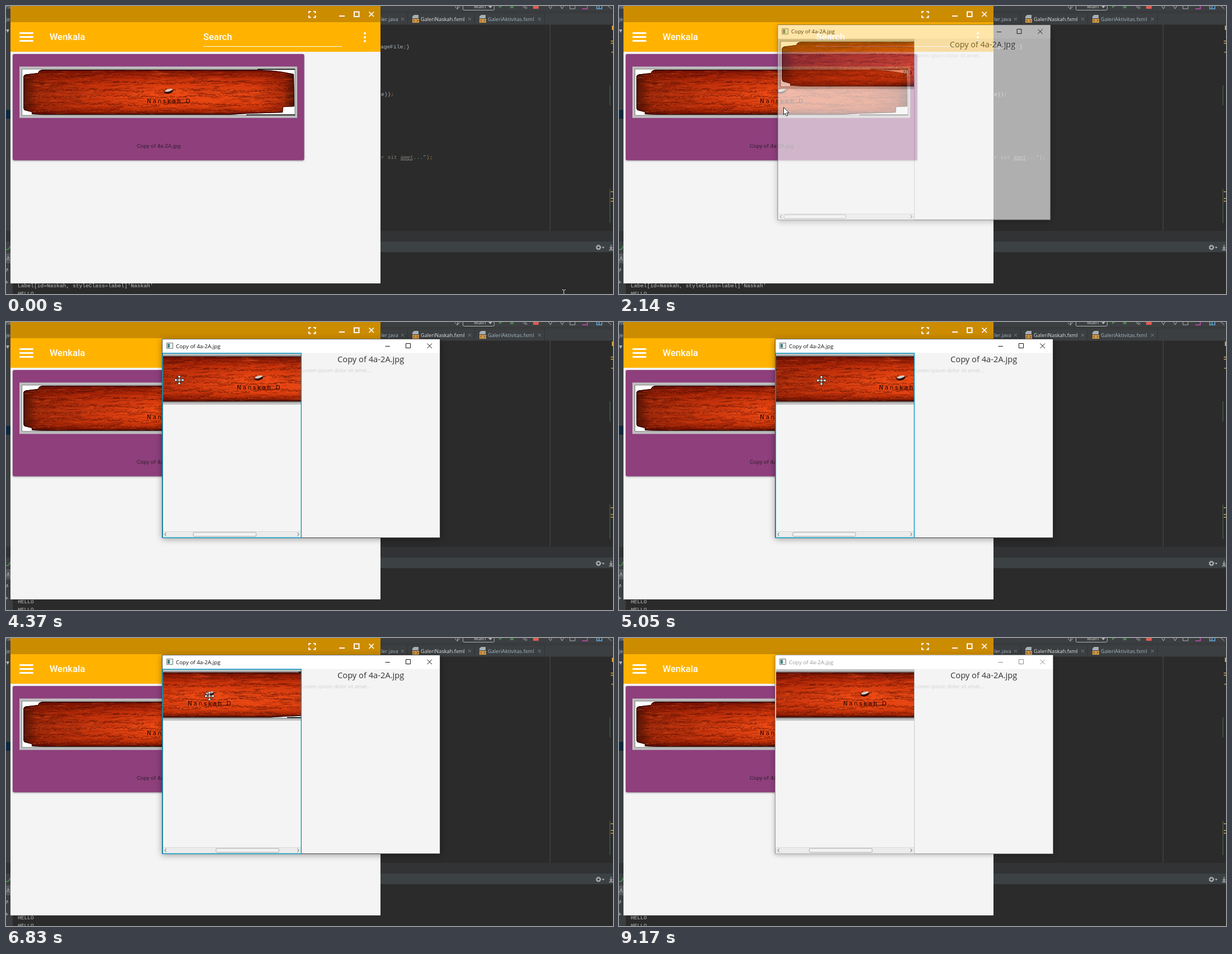
An HTML page that plays this animation: 1086x516 px, repeating every 9.34 s.

```html
<!DOCTYPE html>
<html lang="id">
<head>
<meta charset="utf-8">
<title>Galeri Naskah</title>
<style>
html, body { margin: 0; width: 100%; height: 100%; overflow: hidden; background: #2b2b2b; }
svg { display: block; width: 1086px; height: 516px; }
text { white-space: pre; }
.ui { font-family: "Open Sans", "Noto Sans", sans-serif; }
.app { font-family: Roboto, sans-serif; }
.code { font: 9.65px "Liberation Mono", monospace; fill: #a9b7c6; }
.tab { font-size: 9.2px; fill: #a9b7c6; }
.line { fill: none; stroke: #afb1b3; }
.white { fill: none; stroke: #fff; }
.card { filter: drop-shadow(0 1px 1.500px rgba(0,0,0,.35)); }
.frame { fill: #f4f4f4; stroke: #4b4b4b; filter: drop-shadow(0 2px 6px rgba(0,0,0,.36)); }
.idle .frame { stroke: #9a9a9a; filter: drop-shadow(0 1px 4px rgba(0,0,0,.3)); }
.caption { fill: #111; }
.buttons { fill: none; stroke: #111; }
.idle .caption { fill: #999; }
.idle .buttons { stroke: #8a8a8a; }
</style>
</head>
<body>
<svg viewBox="0 0 1086 516">
<defs>
  <linearGradient id="wood" x2="0" y2="1">
    <stop offset="0" stop-color="#4a0a00"/><stop offset=".08" stop-color="#9c2006"/>
    <stop offset=".25" stop-color="#cf360b"/><stop offset=".55" stop-color="#ee4a14"/>
    <stop offset=".8" stop-color="#e4420f"/><stop offset=".93" stop-color="#a82706"/>
    <stop offset="1" stop-color="#300500"/>
  </linearGradient>
  <linearGradient id="ends">
    <stop offset="0" stop-color="#1c0300" stop-opacity=".75"/><stop offset=".05" stop-color="#500a00" stop-opacity=".5"/>
    <stop offset=".3" stop-color="#800f00" stop-opacity=".25"/><stop offset=".48" stop-color="#800f00" stop-opacity="0"/>
    <stop offset=".85" stop-color="#800f00" stop-opacity=".08"/><stop offset=".96" stop-color="#5a0a00" stop-opacity=".45"/>
    <stop offset="1" stop-color="#1c0300" stop-opacity=".75"/>
  </linearGradient>
  <path id="plank" d="M31 127Q32 122 40 122L57 120Q59 114 67 114L445 114Q480 115 500 119L515 122L516 180L496 181L495 191L432 193L400 195H70L46 194V190L34 187Q31 186 31 180Z"/>
  <clipPath id="plankClip"><use href="#plank"/></clipPath>
  <clipPath id="paneClip"><path d="M281 56H528V375H281Z"/></clipPath>
  <g id="photo">
    <path fill="#c0c0c0" d="M24 108.500H521V200.500H24Z"/>
    <path fill="#fff" stroke="#777" d="M28.500 113H517V196H28.500Z"/>
    <path stroke="#000" stroke-width="1.500" d="M430 195H517M450 113.500H517"/>
    <use href="#plank" fill="url(#wood)"/>
    <use href="#plank" fill="url(#ends)"/>
    <g clip-path="url(#plankClip)" fill="none">
      <path id="shade" stroke="#7a1000" stroke-opacity=".22" stroke-width="2.500"/>
      <path id="darkGrain" stroke="#2a0400" stroke-opacity=".38" stroke-width=".7"/>
      <path id="lightGrain" stroke="#ff6a2c" stroke-opacity=".4" stroke-width=".7"/>
      <path id="script" stroke="#330800" stroke-opacity=".55" stroke-width=".9"/>
      <use href="#plank" stroke="#170200" stroke-width="2.200" stroke-opacity=".75"/>
    </g>
    <ellipse cx="291" cy="153" rx="8" ry="4" fill="#2a0a04" transform="rotate(-10 291 153)"/>
    <ellipse cx="291" cy="151" rx="7" ry="2.200" fill="#d5cdc6" transform="rotate(-14 291 151)"/>
    <text x="252" y="173.500" font-family="DejaVu Sans, sans-serif" font-size="10.500" letter-spacing="2.600" fill="#1c0400">Nanskah D</text>
  </g>
</defs>

<!-- editor -->
<path fill="#2b2b2b" d="M0 0H1086V516H0Z"/>
<path fill="#3c3f41" d="M0 0H1086V33H0ZM0 33H8V516H0ZM0 497H12V516H0Z"/>
<path stroke="#323232" d="M670 9.500H1086M670 12.500H1086M670 33.500H1086"/>
<path stroke="#2f3133" d="M718.500 13V33M838.500 13V33M963.500 13V33"/>
<g class="ui tab">
  <text x="671" y="27">ler.java</text>
  <text x="742" y="27" style="fill:#e2e2e2">GaleriNaskah.fxml</text>
  <text x="862" y="27" style="fill:#9fb6c4">GaleriAktivitas.fxml</text>
  <text x="837" y="4" style="fill:#ccc">Main</text>
  <text x="0" y="5">ne</text>
  <text x="0" y="27">je</text>
</g>
<g id="tabIcons"></g>
<path class="line" stroke="#6b6e70" d="M817.500 0V5Q817.500 7.500 820 7.500H871Q873.500 7.500 873.500 5V0"/>
<path fill="#afb1b3" d="M863 0H870L866.500 4ZM0 42H6L3 48Z"/>
<path class="line" d="M803 1L808 6V0M808 4L812 1M925 1L931 5M928 0L933 4M971 0L974 5L977 0M992 0L995 5L998 0M1077 0L1083 5"/>
<path fill="#4b7f52" d="M882 0H889L882 4ZM902 0H908V4H902Z"/>
<path fill="#e05a50" d="M943 0H953V5H943Z"/>
<path class="line" stroke="#6b6e70" d="M1009 0V5H1018V0"/>
<path fill="none" stroke="#a34a9c" stroke-width="2" d="M1031 5H1040V0"/>
<path fill="none" stroke="#5890b8" stroke-width="2" d="M1057 0V5H1066V0M1061 0V5"/>
<path stroke="#4d4d4d" d="M973.500 33V403"/>
<path stroke="#44584a" stroke-width="1.500" d="M1080.500 142V178M1080.500 327V389"/>
<path fill="#d9a343" d="M1084 35H1086V43H1084ZM1082 62H1086V63.500H1082ZM1082 66H1086V67.500H1082ZM1083 82H1086V83.500H1083ZM1082 332H1086V333.500H1082ZM1082 344H1086V345.500H1082ZM1082 349H1086V350.500H1082Z"/>
<g class="code">
  <text x="670" y="76">ageFile<tspan fill="#cc7832">;</tspan>}</text>
  <text x="671" y="161">e))<tspan fill="#cc7832">;</tspan></text>
  <text x="671" y="273.500" style="fill:#7b8474">r sit amet...")<tspan fill="#cc7832">;</tspan></text>
</g>
<path class="line" stroke="#6d7a68" stroke-width=".8" d="M706 276.500L708 275L710 276.500L712 275L714 276.500L716 275L718 276.500L720 275L722 276.500L724 275L726 276.500L728 275"/>
<path fill="#313335" d="M0 403H1086V422H0Z"/>
<path fill="#3c4144" d="M0 422H1086V441H0Z"/>
<circle cx="1060" cy="432.500" r="3" fill="none" stroke="#afb1b3" stroke-width="2"/>
<circle cx="1060" cy="432.500" r="4.500" fill="none" stroke="#afb1b3" stroke-dasharray="1.770"/>
<path fill="#afb1b3" d="M1066 431.500H1071L1068.500 434.500Z"/>
<path class="line" stroke-width="1.300" d="M1082.500 428V435M1080 432.500L1082.500 435L1085 432.500M1079 437H1086"/>
<path fill="#0d293e" d="M0 186H8V202H0Z"/>
<path fill="none" stroke="#4f9a55" stroke-width="1.500" d="M0 436Q6 438 7 430"/>
<path fill="#55595c" d="M0 443H8V461H0Z"/>
<path class="line" d="M1 456L4 449L6 456M1 476L2 470L4 474M1 492V497M0 495H4"/>
<g class="code" style="fill:#bbb"><text id="log" x="21" y="503.500"></text><text x="21" y="517.500">HELLO</text></g>

<!-- gallery window -->
<path fill="#f4f4f4" d="M8 0H670V497H8Z"/>
<path fill="#cc8c00" d="M8 0H670V29H8Z"/>
<path fill="#ffb300" d="M8 29H670V82H8Z"/>
<g class="white" stroke-width="2">
  <path d="M542 13V10H545.500M550 10H553.500V13M553.500 17V20.500H550M545.500 20.500H542V17"/>
  <path d="M596 18H606M623 10.500H631.500V19H623Z"/>
  <path stroke-width="1.700" d="M649.500 10.500L658 19M658 10.500L649.500 19"/>
  <path stroke-width="3.200" stroke-linecap="round" d="M25.500 48.500H47.500M25.500 55.500H47.500M25.500 62.500H47.500"/>
  <path stroke-width="1" d="M353 72.500H601"/>
  <path stroke-width="4" stroke-linecap="round" d="M642 49h.01M642 56h.01M642 63h.01"/>
</g>
<g class="app" font-weight="500" font-size="16.600" fill="#fff">
  <text x="78" y="61">Wenkala</text><text x="353" y="61">Search</text>
</g>
<rect class="card" x="12" y="86" width="521.500" height="190.500" rx="3" fill="#8e3f7c"/>
<use href="#photo"/>
<text class="app" x="234" y="253.500" font-size="9.950" fill="#33222f">Copy of 4a-2A.jpg</text>

<!-- detail window -->
<g id="popup">
  <path class="frame" d="M279.500 30.500H776.500V386.500H279.500Z"/>
  <path fill="#fff" d="M280 31H776V55.500H280Z"/>
  <path fill="#e9eeee" stroke="#777" d="M287.500 37.500H298.500V47.500H287.500Z"/>
  <path fill="#3f8580" d="M289 39H293V46H289Z"/>
  <g class="ui">
    <text class="caption" x="304" y="46.500" font-size="9.800">Copy of 4a-2A.jpg</text>
    <text x="593" y="72" font-size="14.700" fill="#333">Copy of 4a-2A.jpg</text>
    <text x="529" y="89.500" font-size="9.050" fill="#cfcfcf">Lorem ipsum dolor sit amet...</text>
  </g>
  <path class="buttons" d="M678.500 43.500H687M715.500 38.500H723.500V46.500H715.500ZM753.500 38.500L762 47M762 38.500L753.500 47"/>
  <g clip-path="url(#paneClip)"><use id="scan" href="#photo"/></g>
  <path fill="#ececec" stroke="#d8d8d8" d="M280.500 375.500H528V386H280.500Z"/>
  <path fill="none" stroke="#555" d="M286.500 377.500L284 380.500L286.500 383.500M521.500 377.500L524 380.500L521.500 383.500"/>
  <rect id="thumb" x="291" y="377" width="112.500" height="7" rx="2" fill="#f3f3f3" stroke="#aaa"/>
  <path stroke="#c8c8c8" d="M528.500 56V386"/>
  <path id="focus" fill="none" stroke="#0a9bc4" stroke-width="1.400" d="M280.300 56H528.300V386.500H280.300Z"/>
</g>

<!-- pointers -->
<path id="beam" fill="none" stroke="#e8e8e8" d="M-3 -6.500H-1L0 -5.500L1 -6.500H3M0 -5.500V5.500M-3 6.500H-1L0 5.500L1 6.500H3"/>
<path id="arrow" fill="#fff" stroke="#111" stroke-width=".9" d="M.5 .5V14L3.500 11L5.500 16L8 15L6 10.300H10Z"/>
<path id="move" fill="#fff" stroke="#111" stroke-width=".9" d="M0 -9L3.500 -5H1V-1H5V-3.500L9 0L5 3.500V1H1V5H3.500L0 9L-3.500 5H-1V1H-5V3.500L-9 0L-5 -3.500V-1H-1V-5H-3.500Z"/>
</svg>
<script>
const LOOP = 9340;
const el = id => document.getElementById(id);

let seed = 41;
const rnd = () => (seed = seed * 16807 % 2147483647) / 2147483647;

function grain(count, maxLen) {
  let d = '';
  for (let i = 0; i < count; i++) {
    const x = 30 + rnd() * 480, y = 115 + rnd() * 79, len = 3 + rnd() * maxLen;
    d += `M${x.toFixed(1)} ${y.toFixed(1)}l${len.toFixed(1)} ${(rnd() * 2 - 1.2).toFixed(1)}`;
  }
  return d;
}

// Rows of small handwriting, broken into words of uneven density
function scriptRows() {
  let d = '';
  for (const y of [124, 137, 151, 162, 176, 188]) {
    for (let x = 40; x < 508; x += 1.5 + rnd() * 2.5) {
      if (rnd() < .15) x += rnd() * 5;
      const top = y + Math.sin(x / 30 + y) * 1.8 + rnd() * 3 - 1;
      d += `M${x.toFixed(1)} ${top.toFixed(1)}l${(1 + rnd() * 2).toFixed(1)} ${(-rnd() * 2.5).toFixed(1)}l1 ${(rnd() * 2.5).toFixed(1)}`;
    }
  }
  return d;
}

el('shade').setAttribute('d', grain(150, 30));
el('darkGrain').setAttribute('d', grain(480, 22));
el('lightGrain').setAttribute('d', grain(240, 20));
el('script').setAttribute('d', scriptRows());

const fileIcon = x => `<path fill="#a8b0b5" d="M${x + 3} 16h8v6h-11v-3z"/>
  <path fill="#d59a45" d="M${x} 23h12v7h-12z"/>
  <path fill="none" stroke="#333" d="M${x + 4} 24.500l-2 2l2 2m4 -4l2 2l-2 2"/>`;
const cross = x => `<path stroke="#85888a" d="M${x - 2.500} 21l5 5m0 -5l-5 5"/>`;
el('tabIcons').innerHTML = [727, 847].map(fileIcon).join('') + [709.5, 829.5, 954.5].map(cross).join('');

// time, x, y
const path = [
  [70, 998, 515], [620, 742, 361], [930, 742, 361], [1300, 278, 172], [1470, 294, 181],
  [2710, 294, 181], [3090, 330, 171.5], [3250, 330, 171.5], [3650, 405, 104], [3800, 405, 104],
  [4370, 310, 104], [4700, 292, 103], [5150, 372, 105], [5500, 300, 104], [5830, 330, 104.5],
  [6050, 365, 104], [6250, 507, 105], [6320, 507, 104], [6830, 364, 104], [7080, 312, 104],
  [7560, 440, 104], [7650, 440, 104], [8080, 1024, 500]
];
// time, opacity, scale
const opening = [[0, 0, 1], [2020, .12, .94], [2080, .4, .965], [2140, .66, .982], [2240, .9, .995], [2340, 1, 1]];

function pointerAt(t) {
  const i = path.findIndex(k => k[0] > t);
  if (i === 0) return path[0].slice(1);
  if (i < 0) return path[path.length - 1].slice(1);
  const a = path[i - 1], b = path[i];
  const p = (t - a[0]) / (b[0] - a[0]), e = p * p * (3 - 2 * p);
  return [a[1] + (b[1] - a[1]) * e, a[2] + (b[2] - a[2]) * e];
}

// The scan follows the pointer while it is held
function scrollAt(t, x) {
  if (t < 3800) return 0;
  if (t < 6050) return 405 - x;
  if (t < 6320) return 40;
  return t < 7560 ? 547 - x : 107;
}

const show = (id, on) => el(id).setAttribute('visibility', on ? 'inherit' : 'hidden');

function draw(t) {
  const [x, y] = pointerAt(t);
  const dragging = t >= 3750 && t < 6050 || t >= 6300 && t < 7600;
  const outside = x > (t < 2020 ? 670 : 777);
  const kind = t >= 8110 ? '' : dragging ? 'move' : outside ? 'beam' : 'arrow';
  for (const id of ['beam', 'arrow', 'move']) {
    show(id, id === kind);
    el(id).setAttribute('transform', `translate(${x} ${y})`);
  }

  const [, alpha, scale] = opening.filter(k => k[0] <= t).pop();
  const popup = el('popup');
  show('popup', alpha > 0);
  popup.setAttribute('opacity', alpha);
  popup.setAttribute('transform', `translate(528 208) scale(${scale}) translate(-528 -208)`);
  popup.setAttribute('class', t >= 9170 ? 'idle' : '');
  show('focus', t >= 3750 && t < 9170);

  const scroll = scrollAt(t, x);
  el('scan').setAttribute('transform', `translate(${256 - scroll} -52.500)`);
  el('thumb').setAttribute('x', 291 + scroll * .463);
  el('log').textContent = t < 2240 ? "Label[id=Naskah, styleClass=label]'Naskah'" : 'HELLO';
}

const start = performance.now();
function tick() {
  draw((performance.now() - start) % LOOP);
  requestAnimationFrame(tick);
}
tick();
</script>
</body>
</html>
```
